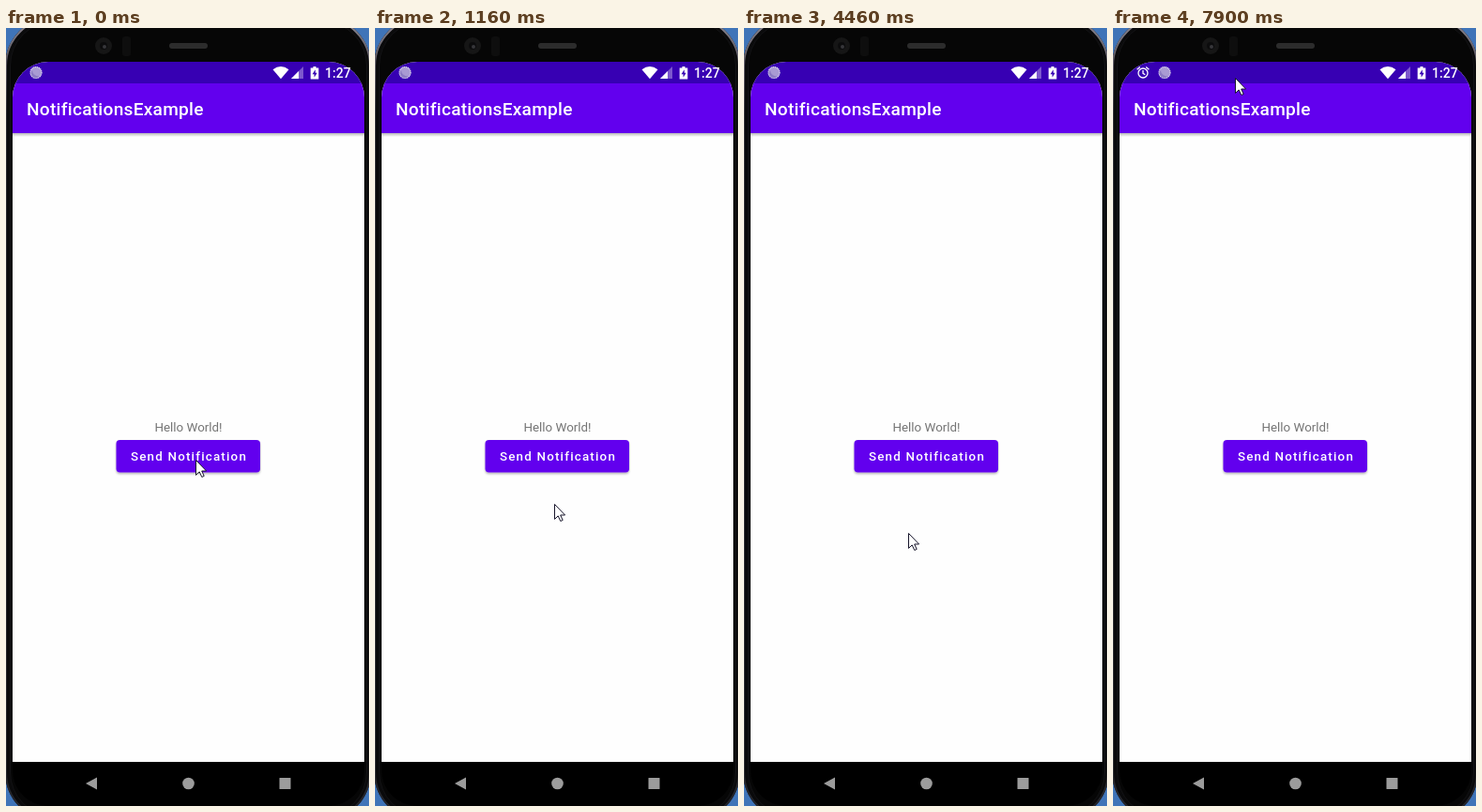
Write an HTML page that moves like this. It is 387 px wide and 829 px high and loops after 8 s.

```html
<!DOCTYPE html>
<html lang="en">
<head>
<meta charset="utf-8">
<title>Notifications demo</title>
<style>
  html, body { margin: 0; width: 100%; height: 100%; overflow: hidden; background: #0a0a0b; }
  svg { display: block; width: 100%; height: 100%; }
  text { font-family: Roboto, sans-serif; fill: #fff; }
  .medium { font-weight: 500; }
</style>
</head>
<body>
<svg viewBox="0 0 387 829">
  <defs>
    <linearGradient id="rim" x2="0" y2="1">
      <stop offset="0" stop-color="#8d8994"/>
      <stop offset=".06" stop-color="#55525c"/>
      <stop offset=".12" stop-color="#29292e"/>
      <stop offset="1" stop-color="#24252b"/>
    </linearGradient>
    <linearGradient id="barShadow" x2="0" y2="1">
      <stop offset="0" stop-opacity=".28"/>
      <stop offset="1" stop-opacity="0"/>
    </linearGradient>
    <filter id="lift" x="-10%" y="-20%" width="120%" height="160%">
      <feDropShadow dx="0" dy="1.5" stdDeviation="1" flood-opacity=".32"/>
    </filter>
    <clipPath id="screen"><rect x="7" y="36" width="375" height="793" rx="38"/></clipPath>
    <clipPath id="buttonArea"><rect x="117.5" y="439" width="153.5" height="34.5" rx="4"/></clipPath>
  </defs>

  <!-- Phone body -->
  <rect width="387" height="829" fill="#3f74b8"/>
  <rect x="-1" y="-12" width="390" height="857" rx="52" fill="#0a0a0b"/>
  <rect x="0" y="-11" width="388" height="855" rx="51" fill="none" stroke="url(#rim)" stroke-width="2"/>
  <rect x="4.5" y="-7" width="380" height="847" rx="47" fill="#060606" stroke="#131315"/>
  <circle cx="104" cy="19" r="9" fill="#161616"/>
  <circle cx="104" cy="19" r="4" fill="#0c0c0d"/>
  <circle cx="105" cy="20" r="2" fill="#37373a"/>
  <rect x="124" y="9" width="9" height="21" rx="3" fill="#0e0e0e"/>
  <rect x="174" y="16" width="41" height="6" rx="3" fill="#2c2c2c"/>

  <!-- Screen -->
  <g clip-path="url(#screen)">
    <rect y="36" width="387" height="746" fill="#fefefe"/>
    <rect y="36" width="387" height="23" fill="#3700b3"/>
    <rect y="59" width="387" height="53" fill="#6200ee"/>
    <rect y="112" width="387" height="4" fill="url(#barShadow)"/>
    <rect y="782" width="387" height="47"/>
  </g>

  <!-- Status bar -->
  <g id="alarm" fill="none" stroke="#fff" stroke-width="1.3" opacity="0">
    <circle cx="32" cy="48" r="5"/>
    <path d="M32 45v3.3l2.3 1.5M25.6 44.3l3.2-2.8M38.4 44.3l-3.2-2.8"/>
  </g>
  <g id="sync">
    <circle r="6" fill="#a99bd3"/>
    <circle r="6" fill="none" stroke="#ded9ef" stroke-width="1.2" stroke-dasharray="1.3 .6"/>
    <path d="M-4.2-2.5A5 5 0 0 0 3.6 3.8 7 7 0 0 1-4.2-2.5Z" fill="#8d7dc3"/>
  </g>
  <path d="M284.5 44.2Q293 37.8 301.5 44.2L293 54.3Z" fill="#fff"/>
  <path d="M304 54L317 41V54Z" fill="#7c58cd"/>
  <path d="M304 54L312 46V54Z" fill="#fff"/>
  <path d="M327.5 41h3v1.4h2.8V54.5h-8.6V42.4h2.8Z" fill="#fff"/>
  <path d="M329.8 44.2l-3.2 5h2v3.6l3.1-5h-1.9Z" fill="#3700b3"/>
  <text class="medium" x="340" y="53" font-size="14">1:27</text>

  <!-- App content -->
  <text class="medium" x="22" y="93" font-size="19.1" letter-spacing=".26">NotificationsExample</text>
  <text x="194.5" y="429.6" font-size="13.36" text-anchor="middle" style="fill:#757575">Hello World!</text>
  <rect x="117.5" y="439" width="153.5" height="34.5" rx="4" fill="#6200ee" filter="url(#lift)"/>
  <g clip-path="url(#buttonArea)"><circle id="ripple" cx="199" cy="465" fill="#fff" opacity="0"/></g>
  <text class="medium" x="133" y="461.4" font-size="13.36" letter-spacing="1.19">Send Notification</text>

  <!-- Navigation bar -->
  <g fill="#9c9c9c">
    <path d="M85 805L97 798.5V811.5Z"/>
    <circle cx="194.5" cy="805" r="6.3"/>
    <rect x="291.5" y="799" width="12" height="12" rx=".5"/>
  </g>

  <path id="cursor" d="M.5.5V16.4L4.2 12.9 6.8 18.5 9.2 17.4 6.7 12H11.6Z" fill="#fff" stroke="#17152b"/>
</svg>

<script>
  const LOOP = 8000;
  const FRAME = 68;
  const [alarm, sync, ripple, cursor] =
    ['alarm', 'sync', 'ripple', 'cursor'].map(id => document.getElementById(id));

  function progress(t, from, to) {
    if (t < from) return 0;
    if (t >= to) return 1;
    const gaps = Math.round((to - from) / FRAME);
    const step = Math.floor((t - from + 1) * gaps / (to - from)) + 1;
    return step / (gaps + 1);
  }

  const mix = (a, b, k) => a + (b - a) * k;
  const along = (a, b, k) => a.map((v, axis) => mix(v, b[axis], k));
  const curve = (a, bend, b, k) => along(along(a, bend, k), along(bend, b, k), k);
  const moveTo = (el, [x, y]) => el.setAttribute('transform', `translate(${x} ${y})`);

  const home = [202, 460];
  const moves = [
    { from: 70, to: 330, end: [201, 463] },
    { from: 480, to: 820, end: [198, 467] },
    { from: 888, to: 1160, end: [191, 507] },
    { from: 1290, to: 1910, end: [166, 530] },
    { from: 3250, to: 3730, end: [175, 538] },
    { from: 7190, to: 7900, end: [130, 53], bend: [-32, 110] }
  ];

  const cursorAt = t => moves.reduce((pos, { from, to, end, bend }) => {
    const k = progress(t, from, to);
    return bend ? curve(pos, bend, end, k) : along(pos, end, k);
  }, home);

  function draw(t) {
    moveTo(cursor, cursorAt(t).map(Math.round));

    const press = progress(t, 480, 1160);
    ripple.setAttribute('r', 95 * Math.min(1, 2 * press));
    ripple.setAttribute('opacity', .2 * Math.min(1, 3 * (1 - press)));

    const arrive = progress(t, 6660, 6860);
    moveTo(sync, [mix(32, 55, arrive), 47.5]);
    alarm.setAttribute('opacity', Math.max(0, mix(-.33, 1, arrive)));
  }

  function tick() {
    draw(performance.now() % LOOP);
    requestAnimationFrame(tick);
  }
  tick();
</script>
</body>
</html>
```
